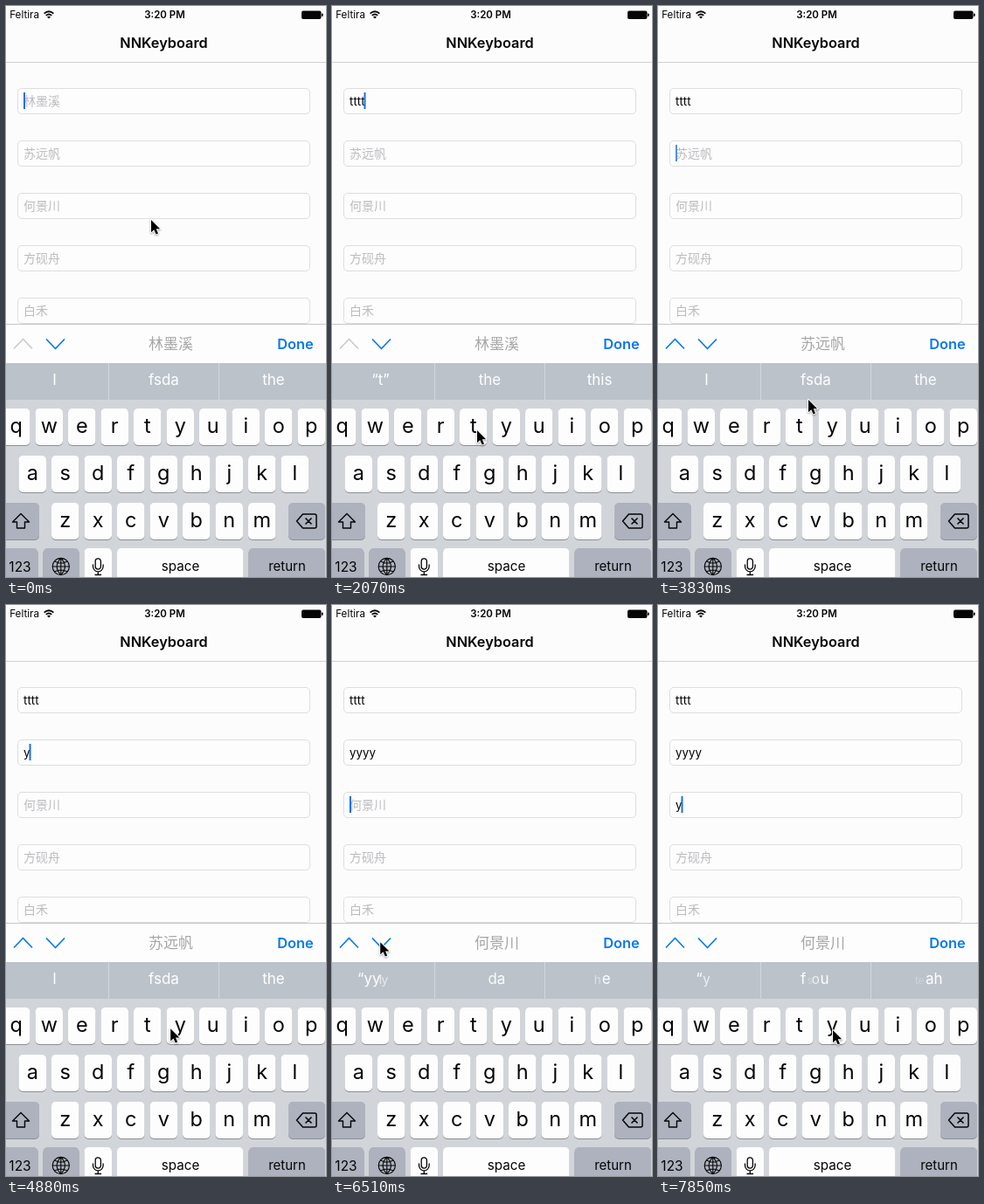
An HTML page with a canvas for the animation above (8 s loop, 366x654 px).

```html
<!DOCTYPE html>
<html lang="zh-Hans">
<head>
<meta charset="utf-8">
<title>NNKeyboard</title>
<style>
html, body { margin: 0; width: 100%; height: 100%; overflow: hidden; background: #fcfcfc; }
canvas { display: block; width: 366px; height: 654px; }
</style>
</head>
<body>
<canvas></canvas>
<script>
const canvas = document.querySelector('canvas');
const ctx = canvas.getContext('2d');
const ratio = Math.max(1, window.devicePixelRatio || 1);
canvas.width = 366 * ratio;
canvas.height = 654 * ratio;

const LOOP = 8000, STEP = LOOP / 54;
const FAMILY = 'Inter, "Noto Sans CJK SC", "Noto Sans CJK", sans-serif';
const BLUE = '#0879ee', BLACK = '#050505';
const NAMES = ['林墨溪', '苏远帆', '何景川', '方砚舟', '白禾'];
const FIELD_FONT = '400 13.4px ', SLOT_SIZE = 17;
const SLOT_X = [55.5, 180.5, 306], MORPH = 250;

// [time, focused field, its text]; every entry restarts the caret blink
const edits = [
  [-450, 0, ''], [1400, 0, 't'], [1600, 0, 'tt'], [1900, 0, 'ttt'], [2000, 0, 'tttt'],
  [3050, 1, ''], [3300, 1, ''], [4880, 1, 'y'], [5030, 1, 'yy'], [5180, 1, 'yyy'], [5330, 1, 'yyyy'],
  [6410, 2, ''], [7727, 2, 'y']
];
const idle = ['I', 'fsda', 'the'];
const suggestions = [
  [-MORPH, idle], [1450, ['“t”', 'the', 'this']], [2130, ['“tttt”', '', '']],
  [3050, idle], [4960, ['“y”', 'you', 'yeah']], [5700, ['“yyyy”', '', '']],
  [6410, idle], [7727, ['“y”', 'you', 'yeah']]
];
// [time, x, y] of the pointer tip
const pointer = [
  [0, 166, 245], [600, 166, 245], [1120, 168, 479], [1780, 168, 480], [2070, 166, 486],
  [2200, 158, 480], [2667, 53, 403], [2900, 55, 386], [3200, 55, 386], [3852, 172, 451],
  [4130, 176, 470], [4700, 188, 485], [5330, 189, 486], [5630, 189, 478],
  [6200, 55, 386], [6500, 55, 386], [7259, 189, 464], [7410, 192, 483],
  [7850, 200, 487], [LOOP, 200, 487]
];

const clamp = v => Math.max(0, Math.min(1, v));
const lastIndex = (list, t) => list.findLastIndex(entry => entry[0] <= t);

function text(str, x, y, font, color, align = 'center') {
  ctx.font = font + FAMILY;
  ctx.fillStyle = color;
  ctx.textAlign = align;
  ctx.fillText(str, x, y);
}

function box(x, y, w, h, r, color) {
  ctx.beginPath();
  ctx.roundRect(x, y, w, h, r);
  ctx.fillStyle = color;
  ctx.fill();
}

function rect(x, y, w, h, color) {
  ctx.fillStyle = color;
  ctx.fillRect(x, y, w, h);
}

function line(path, color, width) {
  ctx.strokeStyle = color;
  ctx.lineWidth = width;
  ctx.stroke(new Path2D(path));
}

function drawHeader() {
  text('Feltira', 38, 14, '400 11.7px ', BLACK, 'right');
  text('3:20 PM', 181.5, 14, '600 11.5px ', BLACK);
  text('NNKeyboard', 180.5, 48, '600 16.3px ', BLACK);
  line('M43.6 8.6Q49 3.9 54.4 8.6M45.7 10.9Q49 8.1 52.3 10.9', BLACK, 1.7);
  ctx.fillStyle = BLACK;
  ctx.fill(new Path2D('M47 12.5Q49 10.9 51 12.5L49 14.6Z'));
  box(338, 5.5, 22.5, 9.5, 2, BLACK);
  box(361, 8.5, 1.6, 3.5, 1, BLACK);
  rect(0, 64, 366, 1, '#d0d0d0');
}

function drawFields(contents, focus, caretAlpha) {
  NAMES.forEach((name, i) => {
    const y = 94 + 60 * i;
    ctx.beginPath();
    ctx.roundRect(13.5, y + .5, 334, 29, 4.5);
    ctx.fillStyle = '#fdfdfd';
    ctx.fill();
    ctx.strokeStyle = '#dedede';
    ctx.lineWidth = 1;
    ctx.stroke();
    const value = contents[i];
    if (value) text(value, 20, y + 19.5, FIELD_FONT, BLACK, 'left');
    else text(name, 20, y + 20, '300 14px ', '#bcbcc0', 'left');
    if (i === focus) {
      ctx.font = FIELD_FONT + FAMILY;
      const x = 20 + (value ? ctx.measureText(value).width - 1 : 0);
      ctx.globalAlpha = caretAlpha;
      rect(x, y + 5, 2, 19, '#1a6fe0');
      ctx.globalAlpha = 1;
    }
  });
}

function drawToolbar(focus) {
  rect(0, 364, 366, 45, '#fdfdfd');
  rect(0, 364, 366, 1, '#c6c6c6');
  line('M9 392.5L19.5 381.5L30 392.5', focus ? BLUE : '#cbcbcb', 1.7);
  line('M46 381.5L56.5 392.5L67 381.5', BLUE, 1.7);
  text(NAMES[focus], 188.5, 393, '500 17px ', '#a6a6a6');
  text('Done', 331, 393, '600 16.4px ', BLUE);
}

// Draws a word glyph by glyph; shown(order) gives each glyph's opacity and size
function glyphs(word, center, fromLeft, shown) {
  const font = size => `400 ${size}px `;
  ctx.font = font(SLOT_SIZE) + FAMILY;
  let x = center - ctx.measureText(word).width / 2;
  [...word].forEach((char, i) => {
    ctx.font = font(SLOT_SIZE) + FAMILY;
    const width = ctx.measureText(char).width;
    const amount = shown(fromLeft ? i : word.length - 1 - i);
    ctx.globalAlpha = amount;
    if (amount > 0) text(char, x + width / 2, 434, font(SLOT_SIZE * (.6 + .4 * amount)), '#fff');
    x += width;
  });
  ctx.globalAlpha = 1;
}

function drawSuggestions(t) {
  rect(0, 409, 366, 42, '#bbc2ca');
  rect(117, 409, 1, 42, '#d3d7dc');
  rect(243, 409, 1, 42, '#d3d7dc');
  const index = lastIndex(suggestions, t);
  const [start, words] = suggestions[index];
  const k = clamp((t - start) / MORPH);
  words.forEach((word, slot) => {
    const x = SLOT_X[slot];
    const old = index ? suggestions[index - 1][1][slot] : word;
    if (k === 1 || old === word) return text(word, x, 434, `400 ${SLOT_SIZE}px `, '#fff');
    glyphs(old, x, false, order => 1 - clamp(5.4 * k - order));
    glyphs(word, x, slot === 0, order => clamp(k * (word.length + .5) - order));
  });
}

function key(x, y, w, dark) {
  box(x, y + 1, w, 42, 5, '#8b8e94');
  box(x, y, w, 42, 5, dark ? '#adb2be' : '#fdfdfd');
}

function drawKeyboard() {
  rect(0, 451, 366, 203, '#d1d5da');
  [['qwertyuiop', -4, 461], ['asdfghjkl', 14.5, 515], ['zxcvbnm', 52, 569]].forEach(([row, left, y]) => {
    [...row].forEach((char, i) => {
      const x = left + 37.5 * i;
      key(x, y, 31.5);
      text(char, x + 15.75, y + 28, '400 23.5px ', BLACK);
    });
  });
  key(-4, 569, 42, true);
  key(323, 569, 42, true);
  key(-4, 621, 40.5, true);
  key(42.5, 621, 41, true);
  key(89.5, 621, 31.5);
  key(127, 621, 144.5);
  key(277.5, 621, 87.5, true);
  text('123', 16, 648, '400 15.5px ', BLACK);
  text('space', 199.5, 647, '400 15.2px ', BLACK);
  text('return', 321.5, 647, '400 15px ', BLACK);

  line('M17 581.5L26.5 591H21.5V598H12.5V591H7.5Z', BLACK, 1.4);
  line('M339.5 582H353Q355 582 355 584V596Q355 598 353 598H339.5L332.5 590ZM342.5 586.5L349.5 593.5M349.5 586.5L342.5 593.5', BLACK, 1.5);
  line('M53.2 642a9.6 9.6 0 1 0 19.2 0a9.6 9.6 0 1 0 -19.2 0H72.4M62.8 632.4V651.6M62.8 632.4Q53.5 642 62.8 651.6Q72.1 642 62.8 632.4M55.5 636Q62.8 640 70.1 636M55.5 648Q62.8 644 70.1 648', BLACK, 1.1);
  line('M102.2 636a3.1 3.1 0 0 1 6.2 0V642a3.1 3.1 0 0 1 -6.2 0ZM99.5 639.5V642a5.8 5.8 0 0 0 11.6 0V639.5M105.3 648V651.5M101.5 651.5H109.1', BLACK, 1.3);
}

function drawPointer(t) {
  const i = Math.min(lastIndex(pointer, t), pointer.length - 2);
  const [t0, x0, y0] = pointer[i], [t1, x1, y1] = pointer[i + 1];
  const u = (t - t0) / (t1 - t0), eased = u * u * (3 - 2 * u);
  const arrow = new Path2D('M0 0V14.2L3.3 11.2L5.6 16.4L8 15.4L5.8 10.3H10.2Z');
  ctx.save();
  ctx.translate(x0 + (x1 - x0) * eased, y0 + (y1 - y0) * eased);
  ctx.strokeStyle = '#fff';
  ctx.lineWidth = 2;
  ctx.shadowColor = 'rgba(0,0,0,.35)';
  ctx.shadowBlur = 2 * ratio;
  ctx.shadowOffsetY = ratio;
  ctx.stroke(arrow);
  ctx.shadowColor = 'transparent';
  ctx.fillStyle = '#000';
  ctx.fill(arrow);
  ctx.restore();
}

function caretOpacity(age) {
  const phase = age % 1100;
  return phase < 1045 ? clamp((850 - phase) / 400) : (phase - 1045) / 55;
}

function draw(t) {
  ctx.setTransform(ratio, 0, 0, ratio, 0, 0);
  ctx.lineJoin = 'round';
  rect(0, 0, 366, 654, '#fcfcfc');
  const index = lastIndex(edits, t);
  const [editedAt, focus] = edits[index];
  const contents = [];
  edits.slice(0, index + 1).forEach(([, field, value]) => contents[field] = value);
  drawHeader();
  drawFields(contents, focus, caretOpacity(t - editedAt));
  drawToolbar(focus);
  drawSuggestions(t);
  drawKeyboard();
  drawPointer(t);
}

// The screen is refreshed at a fixed, low cadence
const begin = performance.now();
function tick() {
  const elapsed = Math.max(0, performance.now() - begin) % LOOP;
  draw(Math.min(53, Math.floor(elapsed / STEP + .16)) * STEP);
  requestAnimationFrame(tick);
}
tick();
</script>
</body>
</html>
```
